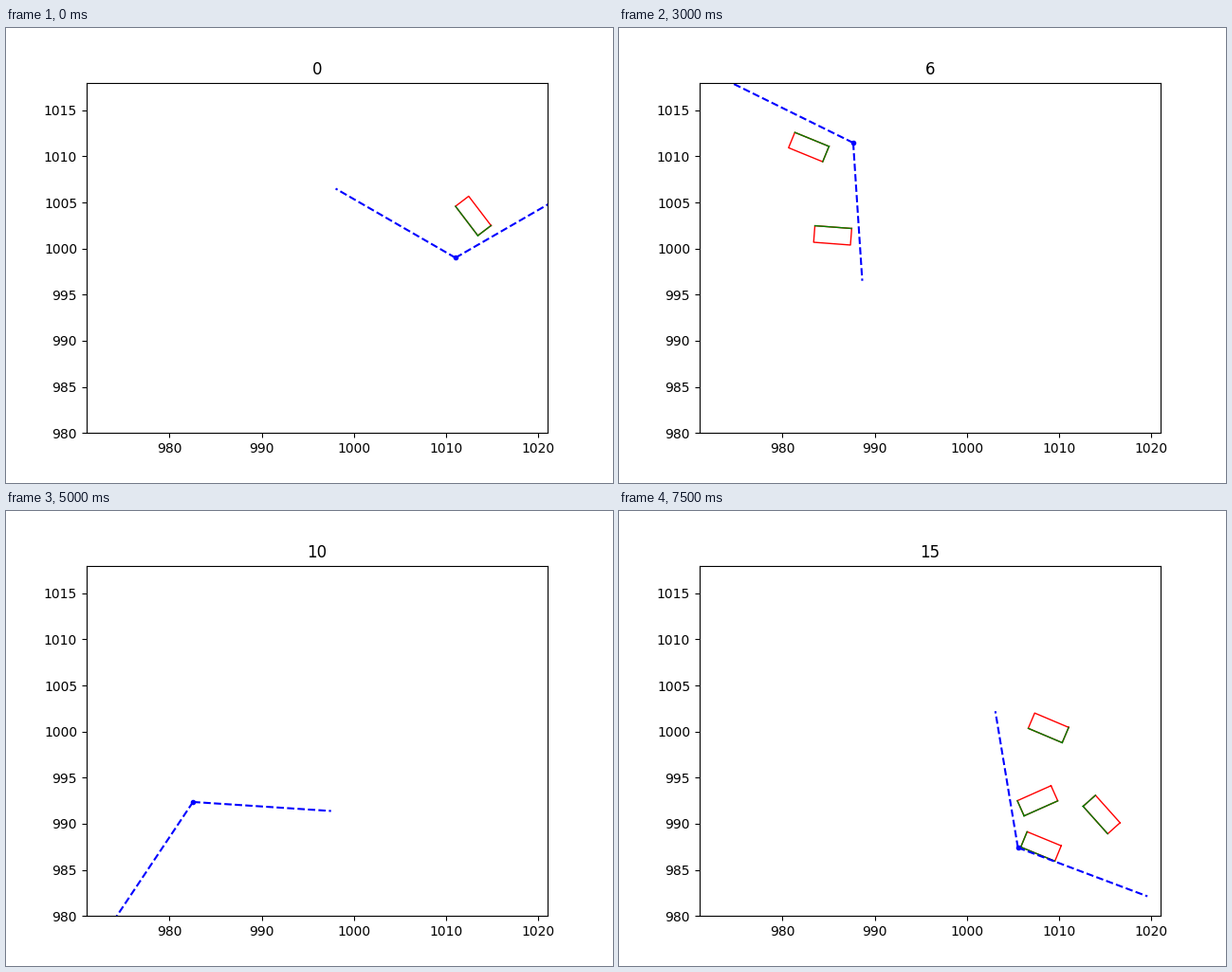
Write a matplotlib script that moves like this. It is 640 by 480 pixels and loops after 8000 ms.

```python
import numpy as np
import matplotlib.pyplot as plt
from matplotlib.animation import FuncAnimation

STEPS = 16
CENTER = np.array([996.0, 999.0])
RADIUS = 15.0            # of the driven circle
REACH = 15.0             # of the sensor rays
TURN = 0.36              # radians per step
HALF_FOV = np.pi / 3
LENGTH, WIDTH = 4.0, 1.8
GAP = np.full((1, 2), np.nan)

# x, y, angle in degrees, speed per step, first and last step in view,
# step at which the car is at x, y
CARS = [
    (1012.93, 1003.54, -52.7, 0.00, 0, 0, 0),
    (984.33, 1010.40, -22.3, -0.80, 4, 6, 4),
    (985.44, 1001.43, -4.3, 0.05, 5, 8, 6),
    (975.19, 1000.65, -22.2, 0.00, 7, 8, 8),
    (978.55, 992.30, -58.0, 0.13, 7, 9, 8),
    (1004.75, 988.89, -22.4, 1.18, 12, 15, 12),
    (1007.65, 992.49, 24.0, 0.00, 13, 15, 15),
    (1014.59, 991.00, -48.2, 0.00, 14, 15, 15),
    (1008.83, 1000.40, -22.9, 0.00, 15, 15, 15),
]


def unit(a):
    return np.array([np.cos(a), np.sin(a)])


def car_corners(car, step):
    x, y, deg, speed, _, _, start = car
    along = unit(np.radians(deg))
    side = np.array([-along[1], along[0]])
    mid = np.array([x, y]) + along * speed * (step - start)
    signs = [(1, 1), (-1, 1), (-1, -1), (1, -1)]   # counter-clockwise
    return np.array([mid + along * a * LENGTH / 2 + side * b * WIDTH / 2
                     for a, b in signs])


def seen_edges(corners, eye, heading):
    """Edges facing the sensor, cut to its field of view."""
    parts = []
    for p, q in zip(corners, np.roll(corners, -1, axis=0)):
        d = q - p
        if np.dot([d[1], -d[0]], eye - p) <= 0:
            continue
        pts = p + np.linspace(0, 1, 61)[:, None] * d
        rel = pts - eye
        bearing = np.arctan2(rel[:, 1], rel[:, 0]) - heading
        bearing = (bearing + np.pi) % (2 * np.pi) - np.pi
        pts[np.abs(bearing) > HALF_FOV] = np.nan
        parts += [pts, GAP]
    return parts


fig, ax = plt.subplots(figsize=(6.4, 4.8), dpi=100)
ax.set_aspect("equal")
ax.set_xlim(971, 1021)
ax.set_ylim(980, 1018)
title = ax.set_title("0")
outline, = ax.plot([], [], "r-", lw=1)
visible, = ax.plot([], [], "g-", lw=1)
rays = [ax.plot([], [], "b--")[0] for _ in range(2)]
dot, = ax.plot([], [], "b.")


def draw(step):
    turned = TURN * step
    heading = turned + np.pi / 2
    eye = CENTER + RADIUS * unit(turned)

    red, green = [GAP], [GAP]
    for car in CARS:
        if car[4] <= step <= car[5]:
            corners = car_corners(car, step)
            red += [corners, corners[:1], GAP]
            green += seen_edges(corners, eye, heading)
    outline.set_data(*np.vstack(red).T)
    visible.set_data(*np.vstack(green).T)

    for ray, side in zip(rays, (1, -1)):
        tip = eye + REACH * unit(heading + side * HALF_FOV)
        ray.set_data(*np.array([eye, tip]).T)
    dot.set_data([eye[0]], [eye[1]])
    title.set_text(str(step))
    return [outline, visible, *rays, dot, title]


anim = FuncAnimation(fig, draw, frames=STEPS, interval=500,
                     repeat=True, repeat_delay=0, blit=False)
plt.show()
```
